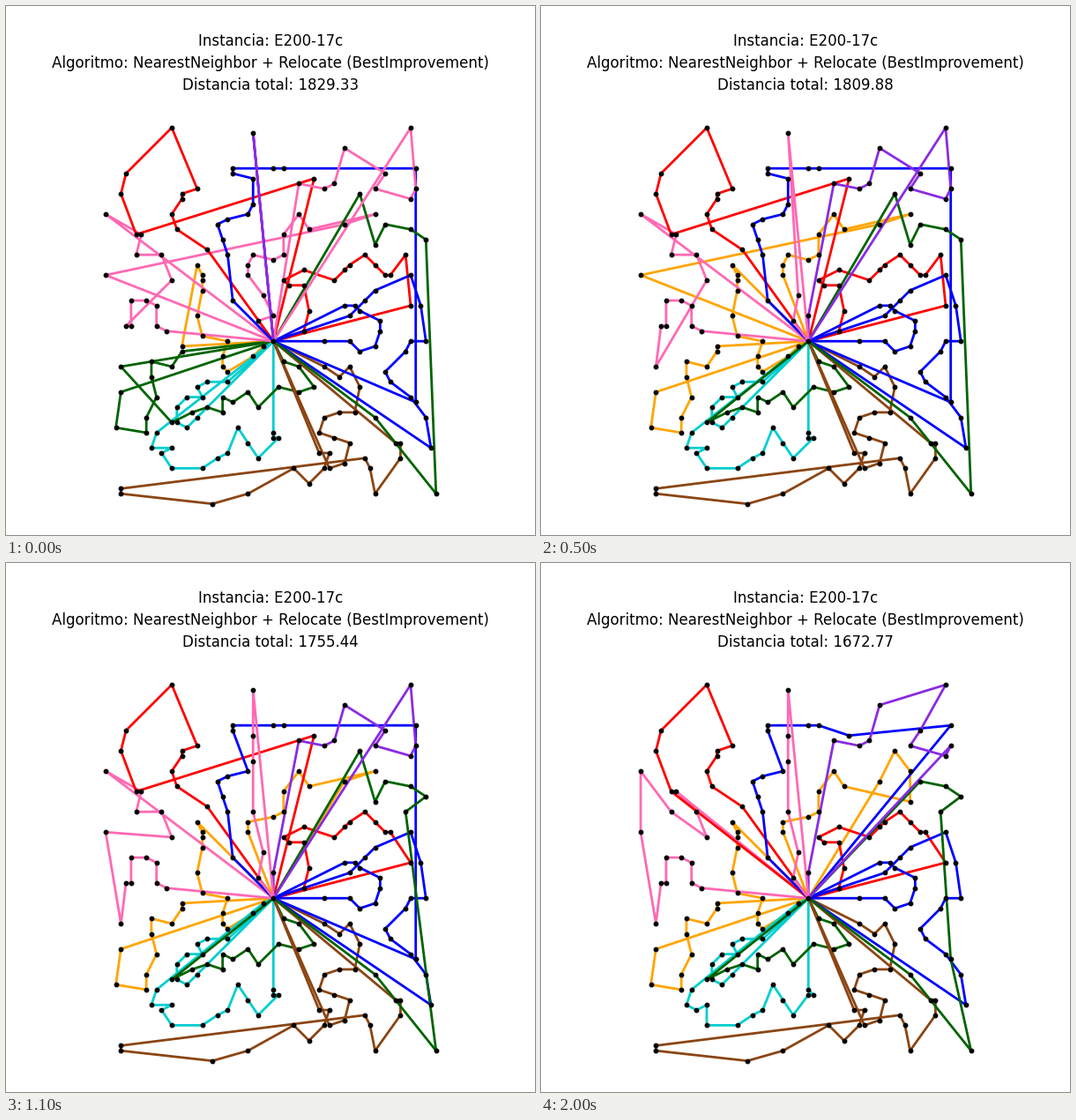
A matplotlib script that plays this animation: 600x600 px, repeating every 2.1 s.

```python
import math
import matplotlib.pyplot as plt
from matplotlib.animation import FuncAnimation

DEPOT = (35, 35)
SCALE, CX, CY = 5.765, 303.3, 380.2   # pixels per unit, depot position
START_COST = 1829.33

RED, BLUE, GREEN, ORANGE = "#ff0000", "#0000ff", "#006400", "#ffa500"
PINK, PURPLE, CYAN, BROWN = "#ff69b4", "#8a2be2", "#00ced1", "#8b4513"

tours, colors = {}, {}


def add(name, color, *xy):
    tours[name] = list(zip(xy[::2], xy[1::2]))
    colors[name] = color


add("west", ORANGE, 33, 34, 31, 32, 26, 29, 25, 30, 25, 32, 26, 35, 21, 36,
    20, 40, 21, 45, 21, 47, 21, 48, 20, 50, 17, 34)
add("far west", GREEN, 5, 25, 4, 18, 10, 17, 10, 20, 12, 24, 11, 28, 11, 31,
    15, 30, 17, 33)
add("south", CYAN, 35, 17, 35, 16, 36, 16, 32, 12, 30, 15, 28, 18, 26, 13,
    24, 12, 21, 10, 15, 10, 13, 13, 15, 14, 11, 14, 12, 17)
add("southwest", CYAN, 26, 27, 22, 27, 20, 26, 21, 24, 18, 24, 16, 22, 16, 19,
    18, 18, 20, 20)
add("center", GREEN, 37, 31, 40, 30, 43, 26, 40, 25, 36, 26, 32, 22, 30, 25,
    27, 23, 25, 24, 25, 21, 22, 22, 19, 21, 15, 19, 5, 30)
add("inner south", BROWN, 45, 30, 48, 28, 50, 30, 52, 26, 51, 21, 48, 21,
    45, 20, 44, 17, 47, 16, 50, 15, 49, 11, 46, 10)
add("far south", BROWN, 59, 15, 60, 15, 60, 12, 55, 5, 54, 10, 53, 12, 5, 6,
    5, 5, 23, 3, 30, 5, 39, 10, 42, 7, 45, 10, 46, 13, 44, 13)
add("north", PINK, 32, 39, 35, 40, 33, 44, 30, 48, 30, 50, 31, 52, 35, 51,
    37, 52, 37, 56, 40, 60, 42, 57, 55, 60, 49, 58, 2, 48)
add("northwest", PINK, 14, 37, 12, 38, 12, 42, 10, 43, 7, 43, 7, 38, 6, 38,
    15, 47, 13, 52, 8, 52, 9, 56, 2, 60)
add("far northwest", RED, 22, 53, 16, 57, 15, 60, 17, 63, 17, 64, 20, 65,
    15, 77, 6, 68, 5, 64, 8, 56, 43, 67)
add("inner east", RED, 41, 37, 42, 41, 41, 46, 38, 46, 37, 47, 41, 49, 47, 47,
    49, 49, 50, 50, 53, 52, 55, 50, 57, 48, 58, 48, 61, 52, 62, 42)
add("far north", BLUE, 27, 43, 26, 52, 25, 55, 24, 58, 26, 59, 30, 60, 31, 62,
    31, 67, 27, 68, 27, 69, 35, 69, 37, 69, 63, 69, 63, 23)
add("east", BLUE, 49, 42, 51, 42, 52, 41, 56, 39, 56, 37, 55, 34, 52, 33,
    50, 35, 45, 35)
add("far east", BLUE, 50, 40, 53, 43, 55, 45, 62, 48, 64, 42, 65, 35, 62, 35,
    61, 33, 57, 29, 58, 27, 62, 24, 65, 20, 66, 14)
add("outer east", GREEN, 52, 64, 55, 54, 57, 58, 62, 57, 65, 55, 67, 5, 55, 20)
add("northeast", PINK, 62, 77, 63, 65, 62, 63, 55, 65, 57, 68, 49, 73, 47, 66,
    45, 65, 40, 66)
add("single", PURPLE, 31, 76)

# each step takes the first node out and puts it right after the second
MOVES = [
    ((17, 34), (17, 33)), ((5, 30), (6, 38)), ((32, 39), (31, 76)),
    ((35, 40), (40, 66)), ((33, 44), (31, 76)), ((31, 52), (31, 76)),
    ((33, 34), (12, 17)), ((2, 48), (5, 30)), ((61, 52), (65, 55)),
    ((31, 67), (31, 76)), ((31, 62), (31, 67)), ((63, 23), (61, 52)),
    ((13, 13), (15, 14)), ((35, 16), (36, 16)), ((43, 67), (37, 69)),
    ((8, 52), (2, 48)), ((2, 60), (2, 48)), ((55, 54), (42, 57)),
    ((52, 64), (55, 60)), ((62, 77), (57, 68)),
]
RECOLOR = {
    1: {"far west": ORANGE},
    3: {"north": PURPLE, "single": PINK},
    4: {"north": ORANGE, "northeast": PURPLE},
}


def closed(nodes):
    return [DEPOT, *nodes, DEPOT]


def cost(plan):
    return sum(math.dist(a, b) for nodes in plan.values()
               for a, b in zip(closed(nodes), closed(nodes)[1:]))


def relocate(plan, node, prev):
    plan = {name: [p for p in nodes if p != node] for name, nodes in plan.items()}
    for nodes in plan.values():
        if prev in nodes:
            nodes.insert(nodes.index(prev) + 1, node)
    return plan


states = [(tours, colors)]
for step, move in enumerate(MOVES, 1):
    plan, shades = states[-1]
    states.append((relocate(plan, *move), {**shades, **RECOLOR.get(step, {})}))

fig = plt.figure(figsize=(6, 6), dpi=100, facecolor="white")
ax = fig.add_axes([0, 0, 1, 1])
ax.set_xlim(35 - CX / SCALE, 35 + (600 - CX) / SCALE)
ax.set_ylim(35 - (600 - CY) / SCALE, 35 + CY / SCALE)
ax.axis("off")


def title(text, y):
    return fig.text(0.5, 1 - y / 600, text, ha="center", va="baseline",
                    fontsize=12, family="DejaVu Sans")


title("Instancia: E200-17c", 45)
title("Algoritmo: NearestNeighbor + Relocate (BestImprovement)", 70)
total = title("", 95)

lines = {name: ax.plot([], [], lw=2)[0] for name in tours}
nodes = [DEPOT] + [p for tour in tours.values() for p in tour]
ax.plot(*zip(*nodes), "o", color="black", ms=3.2, mew=1, zorder=5)


def draw(i):
    plan, shades = states[i]
    for name, line in lines.items():
        line.set_data(*zip(*closed(plan[name])))
        line.set_color(shades[name])
    total.set_text(f"Distancia total: {round(START_COST + cost(plan) - cost(tours), 2)}")
    return [*lines.values(), total]


anim = FuncAnimation(fig, draw, frames=len(states), interval=100,
                     repeat=True, repeat_delay=0, blit=False)
plt.show()
```
